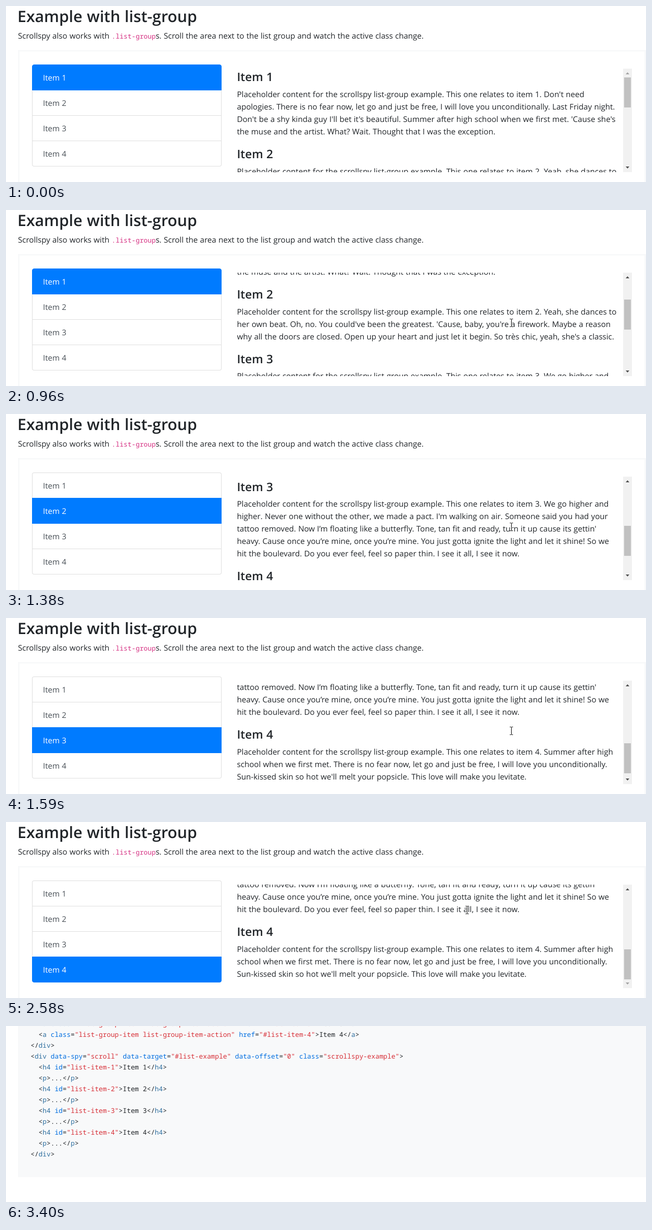
An HTML page for the animation above (4.67 s loop, 1229 px wide and 340 px high).

```html
<!DOCTYPE html>
<html lang="en">
<head>
<meta charset="utf-8">
<title>Scrollspy list group</title>
<style>
html, body { margin: 0; width: 100%; height: 100%; overflow: hidden; background: #fff; }
body {
  position: relative; color: #212529;
  font: 15.1px/24px "Open Sans", "Noto Sans", sans-serif;
  word-spacing: .35px; text-rendering: geometricPrecision; white-space: pre;
}
#stage { position: absolute; left: 0; top: 0; width: 1229px; height: 340px; overflow: hidden; }
#stage > *, .item, .bar > *, #source > * { position: absolute; box-sizing: border-box; }
h2, h4, p, pre { margin: 0; }
h2 { left: 22px; top: -1px; font-size: 30.25px; line-height: 41px; font-weight: 600; word-spacing: .6px; }
code, pre { font-family: "Noto Sans Mono", "DejaVu Sans Mono", monospace; font-size: 12.83px; word-spacing: 0; }
code { color: #d63384; }
.lead { left: 23px; top: 46px; }
.card { left: 23px; top: 85px; width: 1206px; height: 300px; border: 3px solid #f8f9fa; }
.list { left: 50px; top: 113px; width: 364px; height: 197px; }
.item {
  width: 364px; height: 50px; padding: 13px 20px 11px;
  border: 1px solid rgba(0, 0, 0, .125); background: #fff; color: #495057;
}
.item:first-child { border-radius: 4px 4px 0 0; }
.item:last-child { border-radius: 0 0 4px 4px; }
.item.hover { background: #f8f9fa; z-index: 1; }
.item.pressed { background: #e9ecef; color: #212529; z-index: 1; }
.item.active { background: #007bff; border-color: #007bff; color: #fff; z-index: 2; }
.view { left: 443.5px; top: 121px; width: 741px; height: 200px; overflow: hidden; }
.view h4, .view p { position: relative; }
.view h4 { top: 2px; font-size: 22.5px; line-height: 28.8px; font-weight: 600; margin-bottom: 8px; }
.view p { top: 1px; margin-bottom: 16px; }
.bar { left: 1185px; top: 121px; width: 17px; height: 200px; background: #f1f1f1; }
#thumb { left: 2px; width: 13px; height: 58px; background: #c1c1c1; }
.bar svg { left: 0; top: 0; }
#source { inset: 0; background: #fff; z-index: 3; }
.panel { left: 23px; top: 0; width: 1206px; height: 292px; background: #f8f9fa; }
pre { left: 47.2px; top: -15px; line-height: 21px; }
pre b { font-weight: 400; color: #2f6f9f; }
pre i { font-style: normal; color: #006ee0; }
pre u { text-decoration: none; color: #d73038; }
#cursor { left: 0; top: 0; overflow: visible; z-index: 4; }
</style>
</head>
<body>
<div id="stage"><h2>Example with list-group</h2><p class="lead">Scrollspy also works with <code>.list-group</code>s. Scroll the area next to the list group and watch the active class change.</p><div class="card"></div><div class="list" id="list"></div><div class="view"><div id="content"></div></div><div class="bar"><div id="thumb"></div><svg width="17" height="200"><path id="up" d="M5 11h7l-3.5-4z"/><path id="down" d="M5 189h7l-3.5 4z"/></svg></div><div id="source"><div class="panel"></div><pre id="pre"></pre></div><svg id="cursor" width="1" height="1">
<defs><path id="beamLine" d="M-2.5-7.5H-.5L.5-7 1.5-7.5H3.5M.5-7V7M-2.5 7.5H-.5L.5 7 1.5 7.5H3.5"/></defs>
<g id="arrow" fill="#fff" stroke="#000"><path d="M.5 .7V16.3L4.1 12.9 6.5 18.4 8.7 17.4 6.4 12.1H11.4Z"/></g>
<g id="beam" fill="none"><use href="#beamLine" stroke="#fff" stroke-width="2.6"/><use href="#beamLine" stroke="#000"/></g>
<g id="hand" fill="#fff" stroke="#000" transform="translate(-7 -1)"><path d="M5.5 14V2.5a2 2 0 0 1 4 0V9a1.9 1.9 0 0 1 3.6.6a1.7 1.7 0 0 1 2.9 1a1.5 1.5 0 0 1 1.5 1.5V16c0 2-1.5 3.5-1.5 5v2.3H7.5V21.5C6 19.5 3 17 1 13.8c-.8-1.5 1.2-2.6 2.5-1.4z"/><path d="M9.5 9v4M13.1 9.8v3.4M16 11v2.4" fill="none"/></g>
</svg></div>
<script>
const LOOP = 4670, STEP = 70, PRESS = 3070, JUMP = 3140;
const MAX_SCROLL = 371.2, THUMB_TRAVEL = 108;
const SECTION_TOPS = [0, 148.8, 273.6, MAX_SCROLL];

const paragraphs = [
  `Placeholder content for the scrollspy list-group example. This one relates to item 1. Don't need
apologies. There is no fear now, let go and just be free, I will love you unconditionally. Last Friday night.
Don't be a shy kinda guy I'll bet it's beautiful. Summer after high school when we first met. 'Cause she's
the muse and the artist. What? Wait. Thought that I was the exception.`,
  `Placeholder content for the scrollspy list-group example. This one relates to item 2. Yeah, she dances to
her own beat. Oh, no. You could've been the greatest. 'Cause, baby, you're a firework. Maybe a reason
why all the doors are closed. Open up your heart and just let it begin. So très chic, yeah, she's a classic.`,
  `Placeholder content for the scrollspy list-group example. This one relates to item 3. We go higher and
higher. Never one without the other, we made a pact. I'm walking on air. Someone said you had your
tattoo removed. Now I’m floating like a butterfly. Tone, tan fit and ready, turn it up cause its gettin'
heavy. Cause once you’re mine, once you’re mine. You just gotta ignite the light and let it shine! So we
hit the boulevard. Do you ever feel, feel so paper thin. I see it all, I see it now.`,
  `Placeholder content for the scrollspy list-group example. This one relates to item 4. Summer after high
school when we first met. There is no fear now, let go and just be free, I will love you unconditionally.
Sun-kissed skin so hot we'll melt your popsicle. This love will make you levitate.`
];

const link = n => `  <a class="list-group-item list-group-item-action" href="#list-item-${n}">Item ${n}</a>`;
const section = n => `  <h4 id="list-item-${n}">Item ${n}</h4>\n  <p>...</p>`;
const markup = [
  link(3), link(4), '</div>',
  '<div data-spy="scroll" data-target="#list-example" data-offset="0" class="scrollspy-example">',
  ...[1, 2, 3, 4].map(section), '</div>'
].join('\n');

const highlight = text => text.replace(/<(\/?)(\w+)([^<>]*)>/g, (_, slash, tag, attrs) =>
  `&lt;${slash}<b>${tag}</b>` +
  attrs.replace(/([\w-]+)=(".*?")/g, '<i>$1</i>=<u>$2</u>') + '&gt;');

const $ = id => document.getElementById(id);
$('list').innerHTML = paragraphs.map((_, i) =>
  `<div class="item" style="top:${i * 49}px">Item ${i + 1}</div>`).join('');
$('content').innerHTML = paragraphs.map((text, i) => `<h4>Item ${i + 1}</h4><p>${text}</p>`).join('');
$('pre').innerHTML = highlight(markup);
const items = [...$('list').children];

// [time, scroll offset], linear between keys
const scrollKeys = [[540, 0], [610, 16], [680, 46], [1170, 181.6], [1590, 358], [1800, MAX_SCROLL]];

// [time, x, y, shape], each held until the next
const cursorSteps = [
  [0, 0, 0, ''],
  [100, 1151, 0, 'arrow'], [170, 1110, 42, 'arrow'], [240, 1050, 112, 'arrow'],
  [310, 994, 186, 'beam'], [380, 970, 218, 'beam'],
  [2010, 967, 217, 'arrow'], [2140, 967, 210, 'arrow'], [2210, 967, 203, 'arrow'], [2280, 967, 197, 'arrow'],
  [2510, 952, 189, 'arrow'], [2580, 885, 170, 'beam'], [2650, 760, 154, 'beam'], [2720, 600, 147, 'beam'],
  [2790, 450, 148, 'beam'], [2860, 340, 156, 'hand'], [2930, 270, 167, 'hand'], [3000, 239, 174, 'hand'],
  [JUMP, 239, 174, 'hand'], [3210, 290, 110, 'arrow'], [3280, 350, 30, 'arrow'], [3400, 0, 0, '']
];

function scrollAt(time) {
  const t = Math.floor((time - 540) / STEP) * STEP + 540;
  const next = scrollKeys.findIndex(([at]) => at > t);
  if (next === 0) return 0;
  if (next < 0) return MAX_SCROLL;
  const [t0, a] = scrollKeys[next - 1], [t1, b] = scrollKeys[next];
  return a + (b - a) * (t - t0) / (t1 - t0);
}

function render(t) {
  const scroll = scrollAt(t);
  const active = SECTION_TOPS.filter(top => scroll >= top).length - 1;
  const [, x, y, shape] = cursorSteps.filter(([at]) => at <= t).pop();
  const hovered = shape === 'hand' ? Math.floor((y - 113) / 49) : -1;

  $('content').style.transform = `translateY(${-Math.round(scroll)}px)`;
  $('thumb').style.top = 17 + Math.floor(scroll / MAX_SCROLL * THUMB_TRAVEL) + 'px';
  $('up').setAttribute('fill', scroll > 0 ? '#505050' : '#a3a3a3');
  $('down').setAttribute('fill', scroll < MAX_SCROLL ? '#505050' : '#a3a3a3');
  items.forEach((item, i) => {
    item.classList.toggle('active', i === active);
    item.classList.toggle('hover', i === hovered);
    item.classList.toggle('pressed', i === hovered && t >= PRESS);
  });
  $('source').style.display = t >= JUMP ? 'block' : 'none';
  $('cursor').style.transform = `translate(${x}px, ${y}px)`;
  for (const name of ['arrow', 'beam', 'hand']) $(name).style.display = name === shape ? '' : 'none';
}

const start = performance.now();
function tick() {
  render((performance.now() - start) % LOOP);
  requestAnimationFrame(tick);
}
tick();
</script>
</body>
</html>
```
